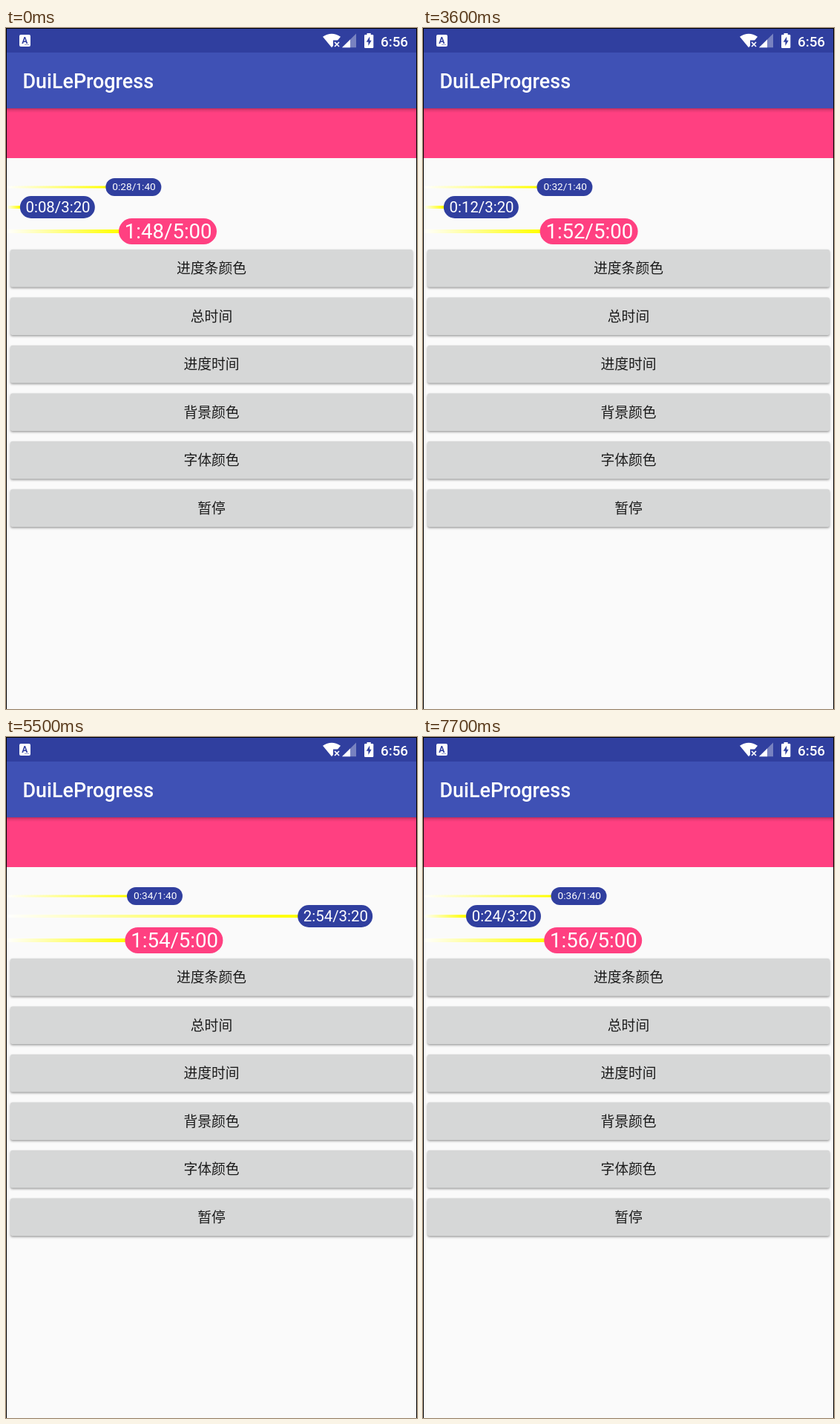
These frames come from a looping animation (554 px wide and 916 px high, 8 s). An HTML page with a canvas:

```html
<!DOCTYPE html>
<html lang="zh">
<head>
<meta charset="utf-8">
<title>Progress bars</title>
<style>
html, body { margin: 0; width: 100%; height: 100%; overflow: hidden; background: #fafafa; }
canvas { display: block; }
</style>
</head>
<body>
<canvas id="stage" width="554" height="916"></canvas>
<script>
const ctx = document.getElementById('stage').getContext('2d');
const LOOP = 8000;
const INDIGO = '#3f51b5', DARK = '#303f9f', PINK = '#ff4081', WHITE = '#fff';
const LATIN = 'Roboto, sans-serif';
const CJK = '"Noto Sans CJK SC", "Noto Sans CJK", sans-serif';
const LABELS = ['进度条颜色', '总时间', '进度时间', '背景颜色', '字体颜色', '暂停'];

// Once-a-second ticks, as they land in the recording
const TICKS = [900, 1800, 2700, 3600, 4600, 5500, 6400, 7300];

// Dragging the middle bar: start time, pill x, seconds shown
const DRAG = [
  [3900, 90, 38], [4000, 199, 85], [4100, 328, 140], [4200, 407, 172],
  [7000, 441, 187], [7100, 405, 172], [7200, 344, 146], [7300, 270, 115],
  [7400, 200, 85], [7500, 137, 58], [7600, 88, 37], [7700, 58, 24]
];

const BARS = [
  { top: 202, w: 75, h: 24, line: 3, mid: 214, size: 13.7, base: 218.2, start: 28, total: 100, color: DARK },
  { top: 226, w: 101, h: 30, line: 4, mid: 241, size: 20.4, base: 248, start: 8, total: 200, color: DARK },
  { top: 256, w: 132, h: 35, line: 5, mid: 273.5, size: 27.6, base: 283, start: 108, total: 300, color: PINK }
];

function rect(x, y, w, h, fill) {
  ctx.fillStyle = fill;
  ctx.fillRect(x, y, w, h);
}

function round(x, y, w, h, r, fill) {
  ctx.fillStyle = fill;
  ctx.beginPath();
  ctx.roundRect(x, y, w, h, r);
  ctx.fill();
}

function poly(fill, ...p) {
  ctx.fillStyle = fill;
  ctx.beginPath();
  for (let i = 0; i < p.length; i += 2) ctx.lineTo(p[i], p[i + 1]);
  ctx.closePath();
  ctx.fill();
}

function text(str, x, y, font, fill, align = 'left') {
  ctx.font = font;
  ctx.fillStyle = fill;
  ctx.textAlign = align;
  ctx.fillText(str, x, y);
}

function statusBar() {
  rect(1, 1, 552, 32, DARK);

  // Input icon
  round(18, 9, 15, 16, 2, WHITE);
  text('A', 25.2, 20.5, '700 12px ' + LATIN, DARK, 'center');
  for (let i = 0; i < 3; i++) rect(25.5 + i * 2, 22, 1, 1, DARK);

  // Wi-Fi fan with a cross
  ctx.fillStyle = WHITE;
  ctx.beginPath();
  ctx.moveTo(439, 26.3);
  ctx.lineTo(427, 11.8);
  ctx.quadraticCurveTo(439, 3.7, 451, 11.8);
  ctx.closePath();
  ctx.fill();
  rect(441, 16.5, 10, 10, DARK);
  ctx.strokeStyle = WHITE;
  ctx.lineWidth = 1.7;
  ctx.beginPath();
  ctx.moveTo(443, 19);
  ctx.lineTo(449, 25);
  ctx.moveTo(449, 19);
  ctx.lineTo(443, 25);
  ctx.stroke();

  // Signal
  poly('rgba(255,255,255,.35)', 453, 26.3, 472, 7.6, 472, 26.3);
  poly(WHITE, 453, 26.3, 464, 15.5, 464, 26.3);

  // Battery
  round(483, 9, 12.3, 18, 1.2, WHITE);
  rect(486.5, 7, 5.2, 3, WHITE);
  poly(DARK, 490.2, 11.5, 485.7, 18.8, 488.4, 18.8, 488.4, 24, 492.7, 16.8, 490.2, 16.8);

  text('6:56', 505, 24.7, '500 18.8px ' + LATIN, WHITE);
}

function toolbar() {
  rect(1, 108, 552, 67, PINK);
  const shade = ctx.createLinearGradient(0, 108, 0, 114);
  shade.addColorStop(0, 'rgba(0,0,0,.27)');
  shade.addColorStop(0.4, 'rgba(0,0,0,.11)');
  shade.addColorStop(1, 'rgba(0,0,0,0)');
  rect(1, 108, 552, 6, shade);
  rect(1, 33, 552, 75, INDIGO);
  text('DuiLeProgress', 22.5, 81, '500 26.9px ' + LATIN, WHITE);
}

function buttons() {
  LABELS.forEach((label, i) => {
    const y = 298 + i * 64.5;
    ctx.save();
    ctx.shadowColor = 'rgba(0,0,0,.38)';
    ctx.shadowBlur = 3;
    ctx.shadowOffsetY = 1.5;
    round(6, y, 542, 50.5, 2.5, '#d6d7d7');
    ctx.restore();
    text(label, 277, y + 32.4, '18.8px ' + CJK, '#1b1b1b', 'center');
  });
}

const clock = s => Math.floor(s / 60) + ':' + String(s % 60).padStart(2, '0');

function drawBar(b, x, seconds) {
  const fade = ctx.createLinearGradient(1, 0, x, 0);
  fade.addColorStop(0, '#fff');
  fade.addColorStop(1, '#ff0');
  rect(1, b.mid - b.line / 2, x - 1 + b.h / 2, b.line, fade);
  round(x, b.top, b.w, b.h, b.h / 2, b.color);
  text(clock(seconds) + '/' + clock(b.total), x + b.w / 2 + 0.7, b.base,
    b.size + 'px ' + LATIN, WHITE, 'center');
}

function middleState(t) {
  if (t >= 4600 && t < 7000) {
    const seconds = 172 + TICKS.filter(k => k >= 4600 && k <= t).length;
    return { seconds };
  }
  const held = DRAG.filter(d => d[0] <= t).pop();
  return held && { x: held[1], seconds: held[2] };
}

function draw(t) {
  rect(0, 0, 554, 916, '#000');
  rect(1, 1, 552, 915, '#fafafa');
  statusBar();
  toolbar();
  buttons();
  const ticks = TICKS.filter(k => k <= t).length;
  BARS.forEach((b, i) => {
    const state = (i === 1 && middleState(t)) || { seconds: b.start + ticks };
    const x = state.x ?? 0.8 + (552 - b.w) * state.seconds / b.total;
    drawBar(b, x, state.seconds);
  });
}

const begin = performance.now();
function loop() {
  draw((performance.now() - begin) % LOOP);
  requestAnimationFrame(loop);
}
loop();
</script>
</body>
</html>
```
